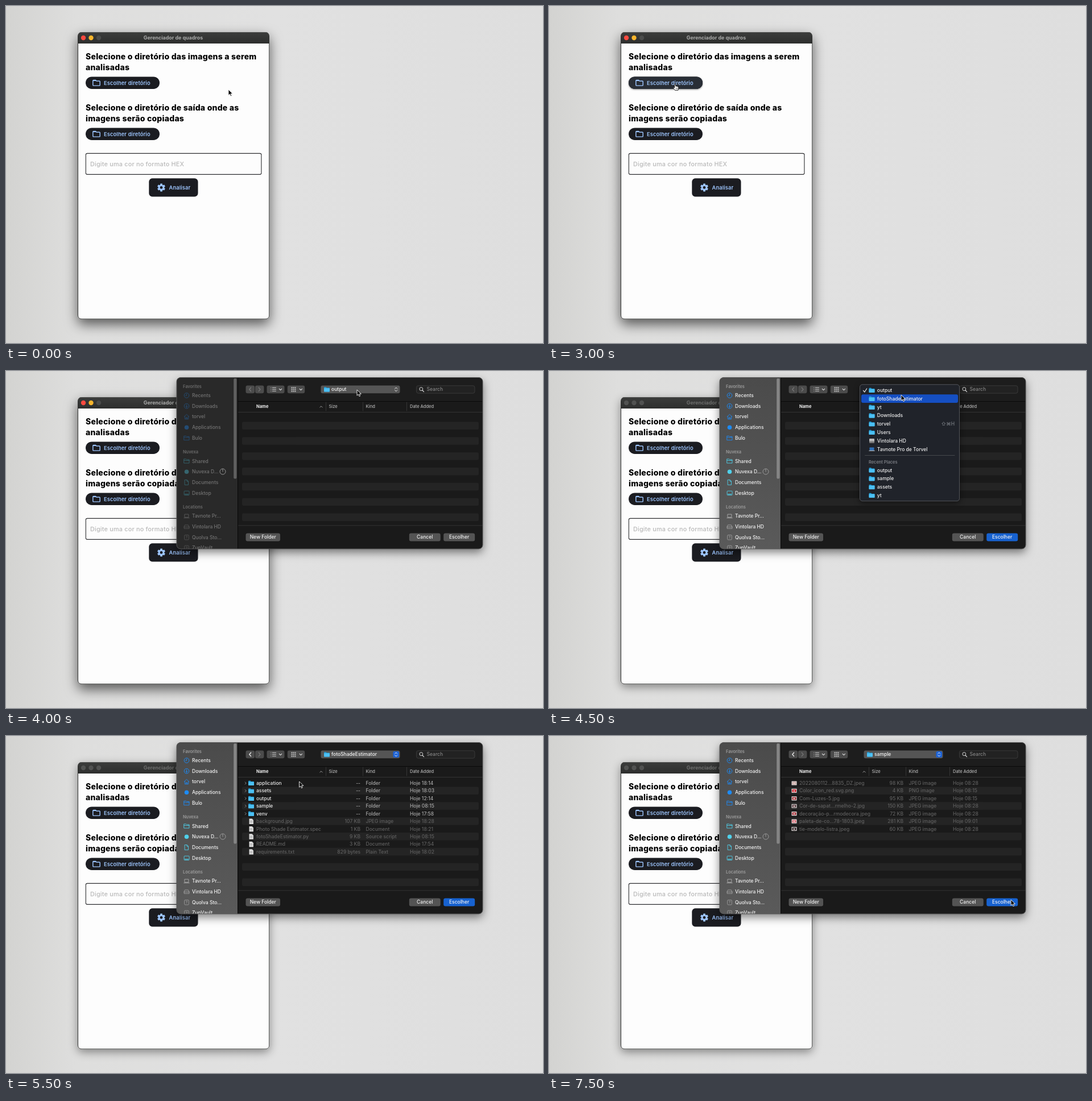
An HTML page that plays this animation: 944 px wide and 593 px high, repeating every 8000 ms.

```html
<!DOCTYPE html>
<html lang="pt-BR">
<head>
<meta charset="utf-8">
<title>Gerenciador de quadros</title>
<style>
html, body { margin: 0; width: 100%; height: 100%; overflow: hidden; background: #dfdfdf; }
svg { display: block; width: 944px; height: 593px; font: 500 8.5px Inter, "DejaVu Sans", sans-serif; }
text { white-space: pre; }
.h { font-size: 14px; font-weight: 800; letter-spacing: .24px; }
.label { font-size: 9.3px; font-weight: 600; letter-spacing: .13px; fill: #9ec6ff; }
.hint { font-size: 10.8px; letter-spacing: .22px; fill: #b9b9b9; }
.title { font-size: 8.9px; font-weight: 700; fill: #a9aaa9; }
.sec { font-size: 7.4px; font-weight: 600; }
.col { font-size: 7.5px; fill: #b4b4b4; }
.line { fill: none; stroke-linecap: round; stroke-linejoin: round; }
#frame { filter: drop-shadow(0 9px 11px rgba(0,0,0,.62)); }
#panel { filter: drop-shadow(0 6px 8px rgba(0,0,0,.5)); }
#side { fill: #292929; }
#nav { opacity: .36; }
#bar { fill: #606060; }
#sections { fill: #6a6a6a; }
#ok { fill: #545454; }
#knob { fill: none; }
.focus #frame { filter: drop-shadow(0 5px 8px rgba(0,0,0,.42)); }
.focus .light { fill: #515251; }
.focus .title { fill: #6c6d6c; }
.focus #side { fill: url(#sideFill); }
.focus #nav { opacity: 1; }
.focus #bar { fill: #858585; }
.focus #sections { fill: #9c9c9c; }
.focus #ok { fill: #1762d0; }
.focus #knob { fill: #1c62d6; }
</style>
</head>
<body>
<svg id="stage" viewBox="0 0 944 593"></svg>
<script>
const STEP = 500, COUNT = 16;
const stage = document.getElementById('stage');

// markup helpers
const rect = (x, y, w, h, r, fill, more = '') =>
  `<rect x="${x}" y="${y}" width="${w}" height="${h}" rx="${r}" ${fill ? `fill="${fill}"` : ''} ${more}/>`;
const text = (x, y, s, fill, cls = '', anchor = 'start') =>
  `<text x="${x}" y="${y}" ${fill ? `fill="${fill}"` : ''} class="${cls}" text-anchor="${anchor}">${s}</text>`;
const line = (d, color, w = 1) => `<path class="line" d="${d}" stroke="${color}" stroke-width="${w}"/>`;
const disc = (x, y, r, fill, more = '') => `<circle cx="${x}" cy="${y}" r="${r}" fill="${fill}" ${more}/>`;
const group = (id, body, more = '') => `<g id="${id}" ${more}>${body}</g>`;
const at = (x, y, body) => `<g transform="translate(${x} ${y})">${body}</g>`;

const folder = (x, y) => at(x, y,
  `<path d="M0 1Q0 0 1 0H3.6L4.8 1.2H9.2Q10 1.2 10 2V7.4Q10 8.2 9.2 8.2H.8Q0 8.2 0 7.4Z" fill="#249bd3"/>` +
  rect(0, 2.1, 10, 6.2, .8, '#4cc0f4'));

// ---- application window ----
function pickButton(y, id) {
  const glow = id ? rect(140, y, 130, 21.6, 10.8, '#292e36',
    'id="hover" style="filter:drop-shadow(0 1px 1.5px rgba(0,0,0,.45))"') : '';
  return rect(140, y, 130, 21.6, 10.8, '#1b1c21') + glow +
    at(152, y + 5.3, line('M.8 1.7V9.2Q.8 10.4 2 10.4H12Q13.2 10.4 13.2 9.2V3.4Q13.2 2.2 12 2.2H7L5.6 .8H1.8Q.8 .8 .8 1.7Z', '#9ec6ff', 1.45) +
      rect(1, .6, 5, 1.8, .6, '#9ec6ff')) +
    text(172, y + 14.1, 'Escolher diretório', '', 'label');
}

function gear(x, y) {
  const teeth = [0, 60, 120].map(a =>
    rect(-2, -7, 4, 14, 1, '#9ec6ff', `transform="rotate(${a})"`)).join('');
  return at(x, y, teeth + disc(0, 0, 5.2, '#9ec6ff') + disc(0, 0, 2.4, '#1b1c21'));
}

const lights = [[136, '#fd4a40'], [149.5, '#f8b52c'], [163, '#4b4c4b']]
  .map(([x, c]) => disc(x, 56, 4.2, c, 'class="light"')).join('');

const app =
  rect(126, 46, 337, 505, 7, '#303130', 'id="frame"') +
  `<path d="M126.5 66V53Q126.5 46.5 133 46.5H456Q462.5 46.5 462.5 53V66Z" fill="url(#barFill)"/>` +
  line('M130 46.6H459', '#5b5c5b', .7) +
  `<path d="M127 66H462.2V544Q462.2 550.2 456 550.2H133Q127 550.2 127 544Z" fill="#fdfdfd"/>` +
  lights + text(294, 59, 'Gerenciador de quadros', '', 'title', 'middle') +
  text(140, 93.6, 'Selecione o diretório das imagens a serem', '#000', 'h') +
  text(140, 113, 'analisadas', '#000', 'h') +
  pickButton(124.4, true) +
  text(140, 183.6, 'Selecione o diretório de saída onde as', '#000', 'h') +
  text(140, 203, 'imagens serão copiadas', '#000', 'h') +
  pickButton(214.4) +
  rect(140.3, 259.4, 308.6, 37, 2.6, 'none', 'stroke="#2c2d30" stroke-width="1.1"') +
  text(148, 281.7, 'Digite uma cor no formato HEX', '', 'hint') +
  rect(251.3, 303.3, 86.2, 32.3, 6, '#1b1c21') + gear(273, 319.4) +
  text(286.5, 322.8, 'Analisar', '', 'label');

// ---- file dialog: sidebar ----
const icons = {
  clock: c => disc(5, 5, 4.3, 'none', `stroke="${c}"`) + line('M5 2.5V5.2H3', c, .9),
  down: c => disc(5, 5, 4.3, 'none', `stroke="${c}"`) + line('M5 2.6V7.2M3 5.4L5 7.3L7 5.4', c, .9),
  home: c => line('M.6 5L5 .9L9.4 5M1.9 4.4V9.2H8.1V4.4M4 9V6.3H6V9', c, .9),
  dot: c => disc(5, 5, 3.8, c),
  folder: c => line('M.6 1.4H4L5 2.4H9.5V8.6H.6ZM.6 4H9.5', c, .9),
  doc: c => line('M2 .6H5.6L8 3V9.4H2ZM5.5 .8V3.2H8', c, .9),
  desk: c => rect(.6, 1.4, 9, 7.2, 1, 'none', `stroke="${c}" stroke-width=".9"`) + line('M2 7H8', c, 1.2),
  laptop: c => line('M1.8 1.8H8.4V7H1.8ZM.3 8.3H9.8', c, 1),
  disk: c => line('M2.3 2H7.8L9.5 5.3V8.2H.6V5.3ZM.6 5.4H9.5', c, .9),
  ask: c => rect(1.2, .8, 7.6, 8.4, 1.4, 'none', `stroke="${c}" stroke-width=".8"`) +
    `<text x="5" y="7.4" font-size="6.5" text-anchor="middle" fill="${c}">?</text>`
};
const BLUE = '#1d8bf5', CYAN = '#4fd0ea', GREY = '#a5a5a5';
const places = [
  [43, 'Recents', 'clock', BLUE], [61.7, 'Downloads', 'down', BLUE], [80.4, 'torvel', 'home', BLUE],
  [99.2, 'Applications', 'dot', BLUE], [118, 'Bulo', 'folder', BLUE],
  [158.5, 'Shared', 'folder', CYAN], [177.2, 'Nuvexa D...', 'dot', CYAN],
  [196, 'Documents', 'doc', CYAN], [214.8, 'Desktop', 'desk', CYAN],
  [255.3, 'Tavnote Pr...', 'laptop', GREY], [274, 'Vintolara HD', 'disk', GREY],
  [292.8, 'Quolva Sto...', 'ask', GREY], [311.4, 'ZupVault', 'ask', GREY]
];
const sidebar =
  rect(300, 12, 107.5, 302, 0, '', 'id="side"') +
  group('sections', [[29.7, 'Favorites'], [145, 'Nuvexa'], [242, 'Locations']]
    .map(([y, s]) => text(311, y, s, '', 'sec')).join('')) +
  group('nav', places.map(([y, s, icon, c]) =>
    at(312.5, y - 5, icons[icon](c)) + text(327, y + 3, s, '#f3f3f3')).join('')) +
  disc(381, 177, 5, 'none', 'stroke="#a0a0a0" stroke-width=".9"') + line('M381 172.5V177', '#a0a0a0', .9) +
  rect(400.2, 13, 5.2, 176.5, 2.6, '', 'id="bar"') +
  rect(407, 12, 1, 302, 0, '#080808');

// ---- file dialog: main area ----
const ROW = 13.42;
const updown = (x, y) => line(`M${x - 2} ${y - 1.3}L${x} ${y - 3.4}L${x + 2} ${y - 1.3}M${x - 2} ${y + 1.3}L${x} ${y + 3.4}L${x + 2} ${y + 1.3}`, '#eee', 1);
const drop = x => line(`M${x - 2.2} 31.3L${x} 33.6L${x + 2.2} 31.3`, '#ddd', 1.1);
const button = (x, y, w, h, fill = '#4b4b4b', more = '') => rect(x, y, w, h, 3.2, fill, more);

let grid = '';
for (let i = 0; i < 3; i++) for (let j = 0; j < 3; j++)
  grid += rect(501.5 + j * 3, 28.2 + i * 3.2, 2, 2.2, .3, '#bbb');
let stripes = '';
for (let i = 0; i < 7; i++) stripes += rect(415, 89.5 + i * ROW * 2, 416, ROW, 2.5, '#242424');

const toolbar =
  button(421.5, 25.6, 15.6, 13.6) + button(438, 25.6, 15.4, 13.6) +
  line('M430.6 29.2L427.8 32.4L430.6 35.6', '#7b7b7b', 1.2) +
  group('back', line('M430.6 29.2L427.8 32.4L430.6 35.6', '#ededed', 1.3)) +
  line('M444.2 29.2L447 32.4L444.2 35.6', '#787878', 1.2) +
  button(458.5, 25.6, 31, 13.6) + drop(482.5) +
  line('M468.3 29.3H474.5M468.3 32.3H474.5M468.3 35.3H474.5M465.8 29.3h.1M465.8 32.3h.1M465.8 35.3h.1', '#ccc', 1) +
  button(494.8, 25.6, 30.4, 13.6) + grid + drop(518.3) +
  button(553.5, 25.6, 139, 13.6, '#555') + folder(559, 28.2) +
  rect(680.4, 27, 10.6, 10.8, 2.4, '', 'id="knob"') + updown(685.7, 32.4) +
  ['output', 'fotoShadeEstimator', 'sample'].map((s, i) =>
    group('path' + i, text(572, 35.4, s, '#f4f4f4'))).join('') +
  rect(721.5, 25.8, 102.5, 13.4, 3.2, '#222', 'stroke="#414141" stroke-width=".8"') +
  disc(729.8, 31.7, 2.9, 'none', 'stroke="#ddd" stroke-width="1"') + line('M732 34L734.6 36.7', '#ddd', 1.1) +
  text(739.5, 35.4, 'Search', '#858585');

const header =
  rect(408, 53, 430, 1, 0, '#0a0a0a') + rect(408, 72, 430, .8, 0, '#3a3a3a') +
  `<text x="440" y="65.2" font-size="7.5" font-weight="700" fill="#f2f2f2">Name</text>` +
  line('M551.8 64L554 61.8L556.2 64', '#aaa', .9) +
  [562.5, 627.5, 704.5].map(x => line(`M${x} 55V70`, '#393939', .9)).join('') +
  text(567.5, 65.2, 'Size', '', 'col') + text(632.5, 65.2, 'Kind', '', 'col') + text(710, 65.2, 'Date Added', '', 'col');

const footer =
  rect(408, 271.4, 430, .9, 0, '#353535') +
  button(421.5, 285.5, 60.5, 14, '#545454') + text(451.7, 295.4, 'New Folder', '#f2f2f2', '', 'middle') +
  button(708.8, 285.5, 55, 14, '#545454') + text(736.2, 295.4, 'Cancel', '#f2f2f2', '', 'middle') +
  button(769.2, 285.5, 55, 14, '', 'id="ok"') + text(796.6, 295.4, 'Escolher', '#f2f2f2', '', 'middle');

function fileRow([name, size, kind, time, thumb], i) {
  const y = 83 + i * ROW, open = kind === 'Folder';
  const main = open ? '#ededed' : '#5f5f5f', side = open ? '#a9a9a9' : '#5f5f5f';
  let icon;
  if (open) icon = line(`M420.2 ${y - 2}L422.2 ${y}L420.2 ${y + 2}`, '#999', .9) + folder(426, y - 4.2);
  else if (thumb) icon = rect(426.5, y - 3.6, 9, 7.2, .4, '#e4e0df') + rect(427.6, y - 2.4, 6.8, 4.8, .3, thumb) +
    rect(429.7, y - 1, 2.4, 2.4, .4, '#e9d5d3');
  else icon = `<path d="M427.5 ${y - 4.6}h5l2.4 2.4v7h-7.4z" fill="#dedede"/>` +
    line(`M429 ${y - .5}h4M429 ${y + 1.6}h4`, '#888', .7);
  return icon + text(440, y + 3, name, main) + text(623, y + 3, size, side, '', 'end') +
    text(632.5, y + 3, kind, side) + text(710, y + 3, 'Hoje ' + time, side);
}

const project = [
  ['application', '--', 'Folder', '18:14'], ['assets', '--', 'Folder', '18:03'],
  ['output', '--', 'Folder', '12:14'], ['sample', '--', 'Folder', '08:15'], ['venv', '--', 'Folder', '17:58'],
  ['background.jpg', '107 KB', 'JPEG image', '18:28'],
  ['Photo Shade Estimator.spec', '1 KB', 'Document', '18:21'],
  ['fotoShadeEstimator.py', '9 KB', 'Source script', '08:15'],
  ['README.md', '3 KB', 'Document', '17:54'], ['requirements.txt', '829 bytes', 'Plain Text', '18:02']
];
const sample = [
  ['2022080112...8835_DZ.jpeg', '98 KB', 'JPEG image', '08:28', '#c9aaa6'],
  ['Color_icon_red.svg.png', '4 KB', 'PNG image', '08:15', '#d3202b'],
  ['Com-Luzes-5.jpg', '95 KB', 'JPEG image', '08:15', '#a12a30'],
  ['Cor-de-sapat...rmelho-2.jpg', '150 KB', 'JPEG image', '08:28', '#564044'],
  ['decoração-p...rmodecora.jpeg', '72 KB', 'JPEG image', '08:28', '#a8333b'],
  ['paleta-de-co...78-1803.jpeg', '281 KB', 'JPEG image', '09:01', '#dc6b75'],
  ['tie-modelo-listra.jpeg', '60 KB', 'JPEG image', '08:28', '#34292b']
];

// ---- location menu ----
const menuRows = ['output', 'fotoShadeEstimator', 'yt', 'Downloads', 'torvel', 'Users', 'Vintolara HD', 'Tavnote Pro de Torvel'];
const recent = ['output', 'sample', 'assets', 'yt'];
function menuItem(s, y, i) {
  let icon = folder(562.5, y - 4.2);
  if (i === 6) icon = rect(563, y - 3.8, 9, 7.6, 1, '#b8b8b8') + rect(563, y + 1, 9, 2.8, .8, '#777');
  if (i === 7) icon = rect(563.5, y - 3, 8, 5.4, .7, '#2d6eb5') + rect(562.3, y + 2.2, 10.4, 1.2, .5, '#aaa');
  return icon + text(576.8, y + 3, s, '#f1f1f1');
}
const menu =
  rect(546.5, 23.8, 175, 205, 4.5, '#20232a', 'stroke="#5b5d62" stroke-width=".9" style="filter:drop-shadow(0 3px 5px rgba(0,0,0,.5))"') +
  rect(549, 41.2, 170, 14.8, 3, '#154fc3') +
  line('M552.5 34.3L554.8 37L558.6 31', '#eee', 1.2) +
  menuRows.map((s, i) => menuItem(s, 34 + i * 14.8, i)).join('') +
  text(713, 96.2, '⇧⌘H', '#777b82', '', 'end') +
  line('M555.5 148.5H713', '#4a4c51', .9) + text(562, 162.7, 'Recent Places', '#7c7f85', 'sec') +
  recent.map((s, i) => menuItem(s, 174.5 + i * 14.8)).join('');

const dialog =
  rect(300, 11.5, 538, 301.5, 7, '#1a1a1a', 'id="panel"') +
  `<g clip-path="url(#dialogClip)">${rect(300, 11, 538, 43, 0, '#1d1d1d')}${stripes}${sidebar}${toolbar}${header}${footer}` +
  group('listA', project.map(fileRow).join('')) + group('listB', sample.map(fileRow).join('')) + '</g>' +
  rect(300, 11.5, 538, 301.5, 7, 'none', 'stroke="#555" stroke-width="1"') +
  group('menu', menu);

// ---- pointer ----
const arrow = `<path d="M0 0V10.2L2.4 8L4 11.7L5.7 10.9L4.2 7.4H7.4Z" fill="#0a0a0a" stroke="#f4f4f4" stroke-width=".9" stroke-linejoin="round"/>`;
const hand = `<path d="M-1.3 .9Q-1.3 -.2 -.3 -.2Q.7 -.2 .7 .9V3.6Q2 3 2.6 4Q3.8 3.5 4.3 4.5Q5.8 4.2 5.8 5.6V7.8L4.8 10.8H-.4L-3.1 7.5Q-3.9 6.2 -2.9 5.8Q-2.1 5.5 -1.3 6.6Z" fill="#fff" stroke="#111" stroke-width=".9" stroke-linejoin="round"/>` +
  line('M1.2 6.5V8.8M2.8 6.5V8.8M4.2 6.5V8.8', '#222', .5);

stage.innerHTML = `<defs>
  <linearGradient id="wall"><stop stop-color="#d3d3d1"/><stop offset=".13" stop-color="#dededd"/>
    <stop offset=".5" stop-color="#e1e1e1"/><stop offset="1" stop-color="#dedede"/></linearGradient>
  <linearGradient id="barFill" x2="0" y2="1"><stop stop-color="#3b3c3b"/><stop offset="1" stop-color="#2d2e2d"/></linearGradient>
  <linearGradient id="sideFill" x2="0" y2="1"><stop stop-color="#4b4b4b"/><stop offset="1" stop-color="#5a5a5a"/></linearGradient>
  <clipPath id="dialogClip">${rect(300, 11.5, 538, 301.5, 7)}</clipPath></defs>` +
  rect(0, 0, 944, 593, 0, 'url(#wall)') + app + group('dialog', dialog) +
  group('pointer', group('arrow', arrow) + group('hand', hand));

// ---- playback: first and last step in which each part shows ----
const spans = {
  hover: [3, 6], hand: [2, 6], dialog: [7, 15], menu: [9, 9], back: [10, 15],
  path0: [7, 9], path1: [10, 13], path2: [14, 15], listA: [10, 13], listB: [14, 15]
};
// step at which the pointer reaches each place
const stops = [
  [0, 391, 147], [1, 318, 143], [2, 222, 137.5], [7, 312.5, 201], [8, 617, 33], [9, 619, 42],
  [11, 515.5, 80], [12, 447, 112], [13, 453, 120], [15, 812, 288]
];
const el = id => document.getElementById(id);
const show = (id, on) => el(id).style.display = on ? '' : 'none';
let last = -1;

function draw(now) {
  const step = Math.floor(now / STEP) % COUNT;
  if (step !== last) {
    last = step;
    for (const id in spans) show(id, step >= spans[id][0] && step <= spans[id][1]);
    show('arrow', step < spans.hand[0] || step > spans.hand[1]);
    const [, x, y] = stops.filter(s => s[0] <= step).pop();
    el('pointer').setAttribute('transform', `translate(${x} ${y})`);
    stage.classList.toggle('focus', step >= 9);
  }
}
const start = performance.now();
function tick() {
  draw(performance.now() - start);
  requestAnimationFrame(tick);
}
tick();
</script>
</body>
</html>
```
